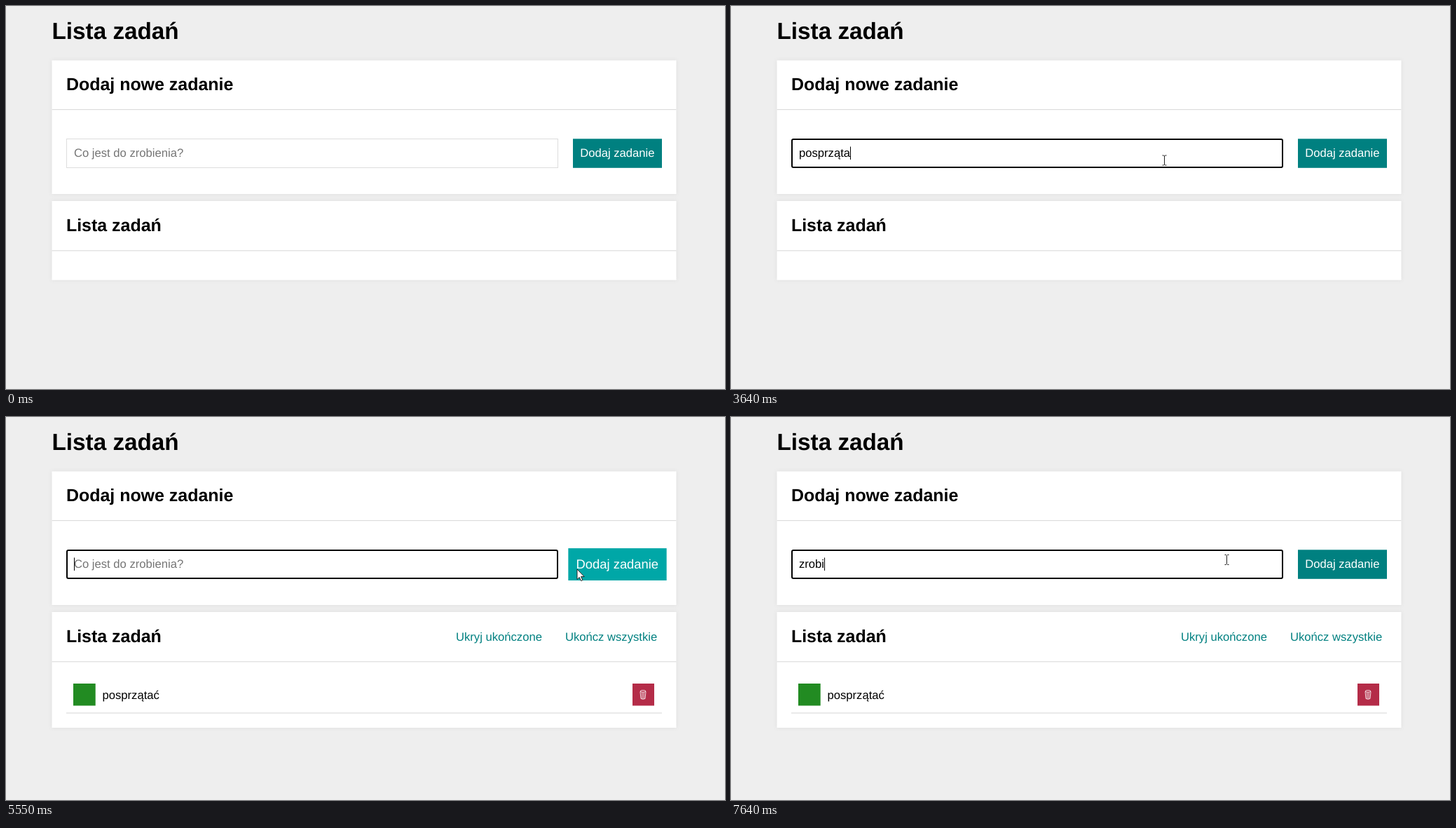
These frames come from a looping animation (1026 by 546 pixels, 8 s). An HTML page:

```html
<!DOCTYPE html>
<html lang="pl">
<head>
<meta charset="utf-8">
<title>Lista zadań</title>
<style>
  html, body { margin: 0; width: 100%; height: 100%; overflow: hidden; background: #eee; }
  svg { display: block; width: 1026px; height: 546px; }
  text {
    font: 16.64px "Liberation Sans", Arial, sans-serif;
    text-rendering: geometricPrecision;
    white-space: pre;
  }
  .h1 { font-size: 33.28px; font-weight: bold; }
  .h2 { font-size: 24.96px; font-weight: bold; }
  .card { fill: #fff; filter: drop-shadow(0 0 2.5px #ddd); }
  .rule { fill: #ddd; }
  .link { fill: #008080; }
  .hint { fill: #757575; }
</style>
</head>
<body>
<svg viewBox="0 0 1026 546">
  <rect width="1026" height="546" fill="#eee"/>
  <text class="h1" x="65.5" y="47.3">Lista zadań</text>

  <rect class="card" x="65.5" y="77.5" width="891" height="190.5"/>
  <text class="h2" x="85.9" y="120.4">Dodaj nowe zadanie</text>
  <rect class="rule" x="65.5" y="147" width="891" height="1.2"/>

  <rect id="border" x="86.5" y="189.5" width="701" height="41" fill="#fff" stroke="#ddd"/>
  <rect id="ring" x="87" y="190" width="700" height="40" rx="2" fill="#fff" stroke="#000" stroke-width="2"/>
  <text id="hint" class="hint" x="97" y="215">Co jest do zrobienia?</text>
  <text id="typed" x="97" y="215"></text>
  <rect id="caret" y="200.5" width="1" height="18.5"/>

  <g id="button">
    <rect id="face" x="809" y="189.3" width="127" height="41.5" fill="#008080"/>
    <text x="819.2" y="215" fill="#fff">Dodaj zadanie</text>
  </g>

  <rect id="list" class="card" x="65.5" y="278" width="891" height="112.7"/>
  <text class="h2" x="85.9" y="321.2">Lista zadań</text>
  <rect class="rule" x="65.5" y="348.2" width="891" height="1.2"/>

  <g id="task">
    <text class="link" x="642" y="318.5">Ukryj ukończone</text>
    <text class="link" x="798" y="318.5">Ukończ wszystkie</text>
    <rect x="96" y="380" width="31.7" height="31.5" fill="#228b22"/>
    <text x="137.5" y="401.6">posprzątać</text>
    <rect x="894" y="380" width="31" height="31.5" fill="#b42c48"/>
    <g fill="none" stroke="#f3dfe3">
      <ellipse cx="909" cy="391" rx="4" ry="1.3"/>
      <path d="M905 391.5L906 401.5Q909 403 912 401.5L913 391.5" />
      <path d="M907.3 393V402M909 393V402M910.7 393V402" stroke-width=".8"/>
    </g>
    <rect class="rule" x="86" y="421.4" width="850" height="1.2"/>
  </g>

  <g id="pointer">
    <circle id="press" cx="-1.5" cy="-.5" r="12.3" fill="#ff6"/>
    <path id="beam" d="M-3 -7H-1L0 -6L1 -7H3M0 -6V6M-3 7H-1L0 6L1 7H3" fill="none" stroke="#222"/>
    <path id="arrow" d="M0 0V14.5L3.3 11.5L5.6 16.6L7.9 15.6L5.6 10.6H10.2Z" fill="#fff" stroke="#222"/>
  </g>
</svg>
<script>
const LOOP = 8000, BLINK = 530, SUBMIT = 5480;
const $ = id => document.getElementById(id);
const show = (id, on) => $(id).setAttribute("display", on ? "inline" : "none");

// Every edit restarts the caret blink.
const edits = [
  [710, ""], [1310, "p"], [1440, "po"], [1710, "pos"], [1910, "posp"], [2320, "pospr"],
  [2640, "posprz"], [3120, "posprzą"], [3510, "posprząt"], [3640, "posprząta"],
  [4110, "posprzątać"], [SUBMIT, ""], [5560, ""], [6630, "z"], [7030, "zr"],
  [7160, "zro"], [7420, "zrob"], [7640, "zrobi"]
];

// Pointer stops: time, x, y
const path = [
  [70, 913, 496], [250, 842, 426], [430, 708, 300], [590, 634, 232], [700, 618.5, 220],
  [4600, 618.5, 220], [4740, 645, 266], [4860, 705, 301], [4970, 775, 266], [5060, 811, 225],
  [5200, 822, 217], [5410, 817, 217], [5550, 815, 217], [5700, 808, 214],
  [5900, 755, 206], [6160, 707.5, 203.5]
];

function slope(i, axis) {
  const a = path[i - 1], b = path[i], c = path[i + 1];
  if (!a || !c || a[axis] === b[axis] || b[axis] === c[axis]) return 0;
  return (c[axis] - a[axis]) / (c[0] - a[0]);
}

function along(t, axis) {
  const last = path.length - 1;
  if (t >= path[last][0]) return path[last][axis];
  const i = Math.max(0, path.findIndex(p => p[0] > t) - 1);
  const a = path[i], b = path[i + 1], d = b[0] - a[0];
  const u = (t - a[0]) / d, v = 1 - u;
  return v * v * (1 + 2 * u) * a[axis] + u * u * (3 - 2 * u) * b[axis]
    + d * u * v * (v * slope(i, axis) - u * slope(i + 1, axis));
}

const ease = (t, from) => {
  const u = Math.min(1, Math.max(0, (t - from) / 300));
  return u * u * (3 - 2 * u);
};

function drawInput(t) {
  const edit = edits.filter(e => e[0] <= t).pop();
  const text = edit ? edit[1] : "";
  const focused = t >= 710 && !(t >= 5410 && t < SUBMIT);
  show("border", !focused);
  show("ring", focused);
  show("hint", !text);
  $("typed").textContent = text;
  const lit = edit && Math.floor((t - edit[0]) / BLINK) % 2 === 0;
  show("caret", focused && lit);
  $("caret").setAttribute("x", 97 + (text ? $("typed").getComputedTextLength() : 0));
}

function drawButton(t) {
  const k = ease(t, 5060) - ease(t, 5760);
  const tone = Math.round(128 + 39 * k);
  $("face").setAttribute("fill", `rgb(0,${tone},${tone})`);
  $("button").setAttribute("transform",
    `translate(872.5 210) scale(${1 + 0.105 * k}) translate(-872.5 -210)`);
}

function drawPointer(t) {
  const x = along(t, 1), y = along(t, 2);
  const inField = x > 86 && x < 788 && y > 189 && y < 231;
  show("pointer", t >= 70);
  show("press", (t >= 705 && t < 770) || (t >= 5410 && t < SUBMIT));
  show("beam", inField);
  show("arrow", !inField);
  $("pointer").setAttribute("transform", `translate(${x} ${y})`);
}

function draw() {
  const t = performance.now() % LOOP;
  drawInput(t);
  drawButton(t);
  drawPointer(t);
  show("task", t >= SUBMIT);
  $("list").setAttribute("height", t >= SUBMIT ? 165 : 112.7);
  requestAnimationFrame(draw);
}
draw();
</script>
</body>
</html>
```
